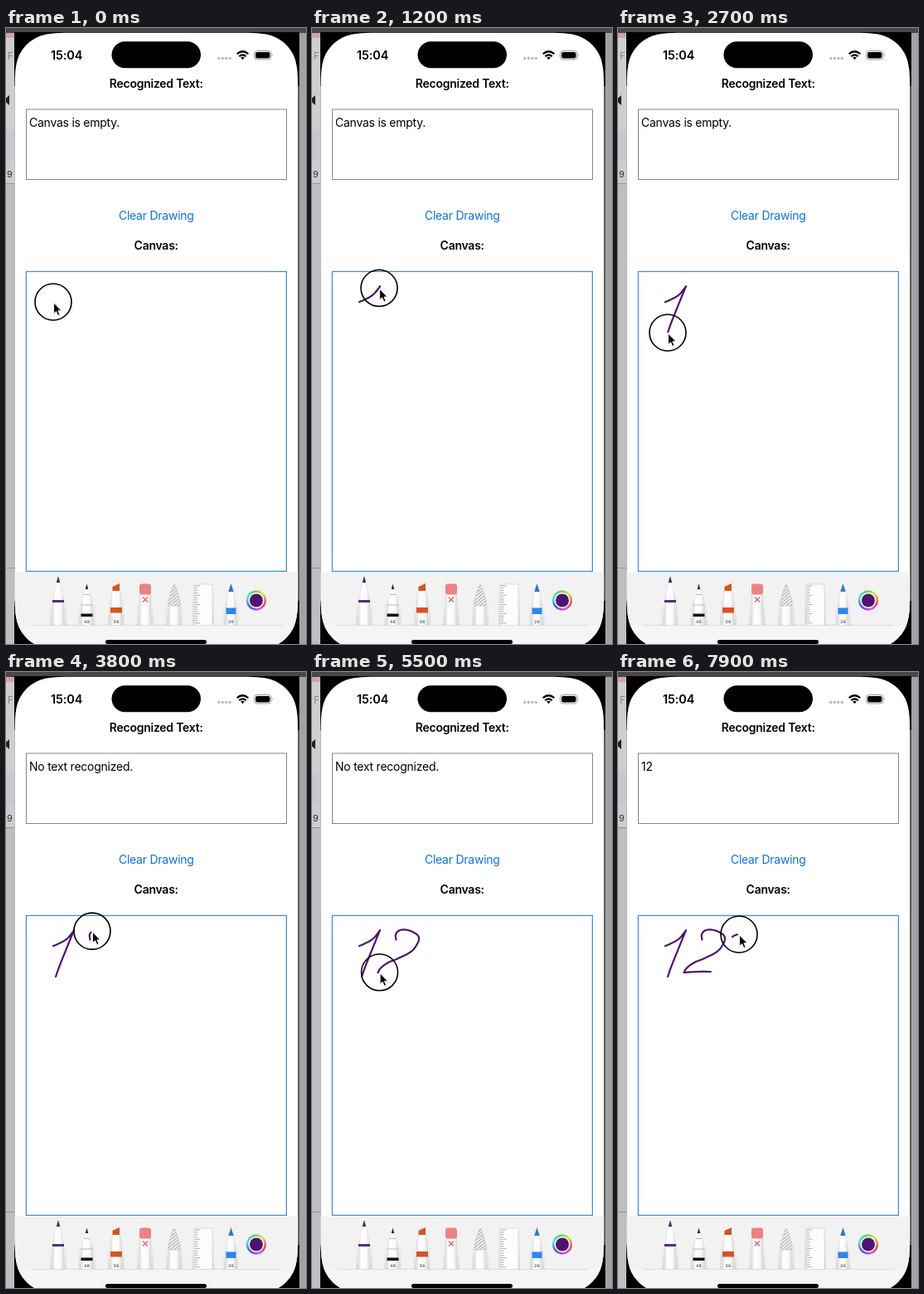
Animation of 362 by 742 pixels, one loop 8 s. Source, as an HTML page:

```html
<!DOCTYPE html>
<html lang="en">
<head>
<meta charset="utf-8">
<title>Handwriting recognition</title>
<style>
  html, body { margin: 0; width: 100%; height: 100%; overflow: hidden; background: #bdbdbf; }
  svg { display: block; width: 362px; height: 742px; }
  text { font: 14px Inter, "Open Sans", sans-serif; letter-spacing: -.25px; }
  .bold { font-weight: 600; }
  .mid { text-anchor: middle; }
  .tiny { font: bold 5px "DejaVu Sans", sans-serif; fill: #777; letter-spacing: 0; text-anchor: middle; }
</style>
</head>
<body>
<svg viewBox="0 0 362 742">
  <defs>
    <linearGradient id="body">
      <stop offset="0" stop-color="#dedede"/><stop offset=".25" stop-color="#fff"/>
      <stop offset=".7" stop-color="#fafafa"/><stop offset="1" stop-color="#d6d6d6"/>
    </linearGradient>
    <linearGradient id="fade" x2="0" y2="1">
      <stop offset="0" stop-color="#ccc" stop-opacity="0"/><stop offset="1" stop-color="#bbb" stop-opacity=".45"/>
    </linearGradient>
    <pattern id="stripes" width="3" height="3" patternUnits="userSpaceOnUse" patternTransform="rotate(-40)">
      <rect width="3" height="3" fill="#f2f2f2"/><rect width="3" height="1" fill="#aaa"/>
    </pattern>
    <clipPath id="screen"><path id="outline"/></clipPath>
  </defs>

  <!-- desktop behind the phone -->
  <rect width="362" height="742" fill="#bebec0"/>
  <rect width="11" height="122" fill="#d0cdcf"/>
  <rect width="11" height="12" fill="#cfa5aa"/>
  <rect y="122" width="11" height="38" fill="#c6c8cf"/>
  <rect y="160" width="11" height="27" fill="#cdcdcf"/>
  <path d="M0 187.5H11M0 650.5H11" stroke="#929294"/>
  <text x="2" y="38" style="font-size:12px" fill="#8b8587">F</text>
  <path d="M4 81V93L-3 87Z" fill="#222"/>
  <text x="1" y="180" style="font-size:11px" fill="#333">9</text>
  <rect x="352" width="10" height="742" fill="#a2a2a4"/>
  <rect width="362" height="6" fill="#4b4648"/>

  <!-- phone -->
  <path d="M10 5H354V742H10Z" fill="#000"/>
  <path d="M10.5 70V690" stroke="#8d8d8f"/>
  <path d="M353 70V690" stroke="#4e4e50" stroke-width="2"/>
  <g clip-path="url(#screen)">
    <rect x="10" y="5" width="343" height="737" fill="#fff"/>
    <rect x="10" y="655.5" width="343" height="87" fill="#f2f2f2"/>
    <g id="tools"></g>
    <rect x="10" y="719" width="343" height="23" fill="#f5f5f5"/>
    <path d="M30 719.5H333" stroke="#dadada"/>
  </g>
  <rect x="120" y="737" width="122" height="5" rx="2.5" fill="#000"/>

  <!-- status bar -->
  <rect x="127.5" y="16.3" width="107.5" height="32" rx="16" fill="#000"/>
  <text class="bold" x="54" y="38" style="font-size:14.5px;letter-spacing:-.1px">15:04</text>
  <path d="M256.8 36.5H273" stroke="#b9b9b9" stroke-width="3.4" stroke-linecap="round" stroke-dasharray="0 4.5"/>
  <g fill="none" stroke="#000" stroke-width="2.2">
    <path d="M278.7 31.3Q285.5 25.2 292.3 31.3M281.3 34.2Q285.5 30.4 289.7 34.2"/>
    <path d="M283.2 35.7Q285.5 34 287.8 35.7L285.5 38.2Z" fill="#000" stroke="none"/>
  </g>
  <rect x="299.5" y="27.5" width="20.5" height="10.5" rx="3.4" fill="none" stroke="#999"/>
  <rect x="301" y="29" width="17.5" height="7.5" rx="2.2"/>
  <path d="M321.3 31V34.6Q322.8 32.8 321.3 31Z" fill="#999"/>

  <!-- app -->
  <text class="bold mid" x="181.2" y="72">Recognized Text:</text>
  <rect x="24.5" y="98" width="314" height="84.5" fill="none" stroke="#858585"/>
  <text id="result" x="28" y="118.6"></text>
  <text class="mid" x="181.3" y="231" fill="#0b72e0">Clear Drawing</text>
  <text class="bold mid" x="181.2" y="267">Canvas:</text>
  <rect x="24.4" y="293.4" width="314" height="361" fill="none" stroke="#3e8bd6" stroke-width="1.2"/>

  <path id="ink" fill="none" stroke="#4f1271" stroke-width="2.2" stroke-linecap="round" stroke-linejoin="round"/>
  <g id="pointer">
    <circle id="touch" r="22" fill="none" stroke="#000" stroke-width="1.6"/>
    <path d="M.6 1V14.2L3.6 11.4L5.8 16.4L8 15.4L5.9 10.6H10Z" stroke="#fff" stroke-width=".9"/>
  </g>
</svg>

<script>
const $ = id => document.getElementById(id);
const LOOP = 8000, INK_LAG = 40, STEP = 25;

// Rounded rectangle with continuous-curvature corners.
function squircle(x0, y0, x1, y1, r) {
  const corner = [[0, 1.528], [0, 1.088], [0, .868], [.075, .631], [.169, .372],
    [.372, .169], [.631, .075], [.868, 0], [1.088, 0], [1.528, 0]];
  const side = (x, y, sx, sy, reverse) => {
    const pts = corner.map(([a, b]) => `${x + sx * a * r} ${y + sy * b * r}`);
    if (reverse) pts.reverse();
    return `${pts[0]}C${pts.slice(1).join(' ')}`;
  };
  return `M${side(x0, y0, 1, 1)}L${side(x1, y0, -1, 1, true)}` +
         `L${side(x1, y1, -1, -1)}L${side(x0, y1, 1, -1, true)}Z`;
}

// ---- drawing tools ----
const rect = (x, y, w, h, fill, rx = 0) =>
  `<rect x="${x}" y="${y}" width="${w}" height="${h}" rx="${rx}" fill="${fill}"/>`;
const shape = (d, fill) => `<path d="${d}" fill="${fill}"/>`;
const line = (d, stroke, width = 1) =>
  `<path d="${d}" fill="none" stroke="${stroke}" stroke-width="${width}"/>`;
const label = (x, s) => `<text class="tiny" x="${x}" y="717">${s}</text>`;

// Barrel whose shoulders taper from a narrow neck to full width.
function barrel(x, neckY, neck, shoulderY, half = 7) {
  const d = `M${x - neck} ${neckY}L${x - half} ${shoulderY}V720H${x + half}V${shoulderY}L${x + neck} ${neckY}Z`;
  return rect(x - half - 3, 690, half * 2 + 6, 30, 'url(#fade)') + shape(d, 'url(#body)') + line(d, '#d8d8d8', .5);
}

function drawTools() {
  let out = '';
  out += barrel(63, 667, 2, 691) + shape('M63 660L60.8 668H65.2Z', '#4f2068') + rect(56, 689, 14, 3, '#5a2a78');
  out += barrel(97.5, 676, 2.5, 694) + shape('M97.5 669.5L95.8 676H99.2Z', '#222')
       + line('M94 682.5H101M90.5 695H104.5', '#b8b8b8') + rect(90.5, 705.5, 14, 3.5, '#111') + label(97.5, '48');
  out += barrel(133, 678, 5, 690) + shape('M128.5 678V673L137 669V678Z', '#d9531e')
       + rect(126, 698, 14, 6.5, '#d9531e') + label(133, '56');
  out += barrel(168, 681, 7, 682) + rect(161, 669.5, 14, 13, '#ec8283', 3)
       + line('M165 685.5L171 691.5M171 685.5L165 691.5', '#dd6060', 1.2);
  const cone = 'M203 670Q201 671 196 691V696H210V691Q205 671 203 670Z';
  out += barrel(203, 690, 7, 692) + shape(cone, 'url(#stripes)') + line(cone, '#bbb', .6);
  out += rect(225, 672, 26, 48, 'url(#fade)') + rect(227, 670, 22, 50, '#fcfcfc') + line('M227 720V670H249V720', '#cfcfcf', .7);
  for (let i = 0; i < 17; i++) out += line(`M227.5 ${672 + i * 2.8}h${i % 4 ? 4 : 7}`, '#8e8e8e', .7);
  out += barrel(271.5, 678, 3, 694, 6) + shape('M271.5 669L268.3 679H274.7Z', '#2e78cf')
       + rect(265.5, 698.5, 12, 7.5, '#2f86ee') + label(271.5, '26');

  const at = (deg, r = 10.8) => {
    const a = deg * Math.PI / 180;
    return `${302 + r * Math.cos(a)} ${689.5 + r * Math.sin(a)}`;
  };
  out += '<circle cx="302" cy="689.5" r="10" fill="#fff"/>';
  for (let d = 0; d < 360; d += 10)
    out += line(`M${at(d)}A10.8 10.8 0 0 1 ${at(d + 11)}`, `hsl(${(370 - d) % 360} 68% 58%)`, 2.6);
  out += '<circle cx="302" cy="689.5" r="8" fill="#511370"/>';
  $('tools').innerHTML = out;
}

// ---- pointer motion: each run is a smooth curve through [ms, x, y] ----
const runs = [
  { down: true, pts: [[100, 57, 330], [400, 65, 326.5], [650, 74, 321], [900, 82, 311.5]] },
  { down: true, pts: [[1150, 82, 311], [1500, 75.5, 327], [2000, 65, 353], [2700, 60, 367]] },
  { down: false, pts: [[2880, 60, 367], [3000, 84, 345], [3100, 101.5, 322.5]] },
  { down: true, pts: [[3550, 101.5, 322.5], [3700, 101, 316], [3850, 106, 311], [4050, 116, 311],
    [4300, 126.5, 316], [4380, 129, 320], [4500, 127.8, 326], [4700, 120, 336.5], [4900, 104, 345],
    [5050, 92, 350], [5200, 83, 356.5], [5350, 79.5, 362]] },
  { down: true, pts: [[5380, 79.5, 362], [5500, 81.5, 361.8], [5700, 97, 361], [5900, 112, 361]] },
  { down: false, pts: [[6000, 112, 361], [6100, 128, 338], [6200, 137, 323], [6700, 137.8, 320]] },
  { down: true, pts: [[7700, 138, 319], [7800, 141, 317.2], [7900, 146, 316], [8000, 150, 317]] }
];

const touches = [[0, 2900], [3500, 6000], [7500, LOOP]];
const results = [[6900, '12'], [3500, 'No text recognized.'], [0, 'Canvas is empty.']];

function along(pts, t) {
  const last = pts.length - 1;
  if (t <= pts[0][0]) return pts[0].slice(1);
  if (t >= pts[last][0]) return pts[last].slice(1);
  const i = pts.findIndex(p => p[0] > t) - 1;
  const a = pts[i], b = pts[i + 1], span = b[0] - a[0], u = (t - a[0]) / span;
  const slope = (k, n) => {
    const p = pts[Math.max(k - 1, 0)], q = pts[Math.min(k + 1, last)];
    return (q[n] - p[n]) / (q[0] - p[0]) * span;
  };
  return [1, 2].map(n =>
    a[n] * (1 + 2 * u) * (1 - u) ** 2 + slope(i, n) * u * (1 - u) ** 2 +
    b[n] * u * u * (3 - 2 * u) + slope(i + 1, n) * u * u * (u - 1));
}

function pointerAt(t) {
  const run = runs.filter(r => r.pts[0][0] <= t).pop() || runs[0];
  return along(run.pts, t);
}

function inkAt(t) {
  let d = '', drawing = false;
  for (const { down, pts } of runs) {
    const start = pts[0][0], end = Math.min(t, pts[pts.length - 1][0]);
    if (!down) { drawing = false; continue; }
    if (end <= start) break;
    const add = time => {
      d += (drawing ? 'L' : 'M') + along(pts, time).map(v => v.toFixed(2)).join(' ');
      drawing = true;
    };
    for (let time = start; time < end; time += STEP) add(time);
    add(end);
  }
  return d;
}

function render(t) {
  const [x, y] = pointerAt(t);
  $('pointer').setAttribute('transform', `translate(${x} ${y})`);
  $('touch').style.display = touches.some(([a, b]) => t >= a && t < b) ? '' : 'none';
  $('ink').setAttribute('d', inkAt(t - INK_LAG));
  $('result').textContent = results.find(([from]) => t >= from)[1];
}

$('outline').setAttribute('d', squircle(10.6, 5.8, 352.2, 749, 49));
drawTools();
const began = performance.now();
function tick() {
  render((performance.now() - began) % LOOP);
  requestAnimationFrame(tick);
}
tick();
</script>
</body>
</html>
```
